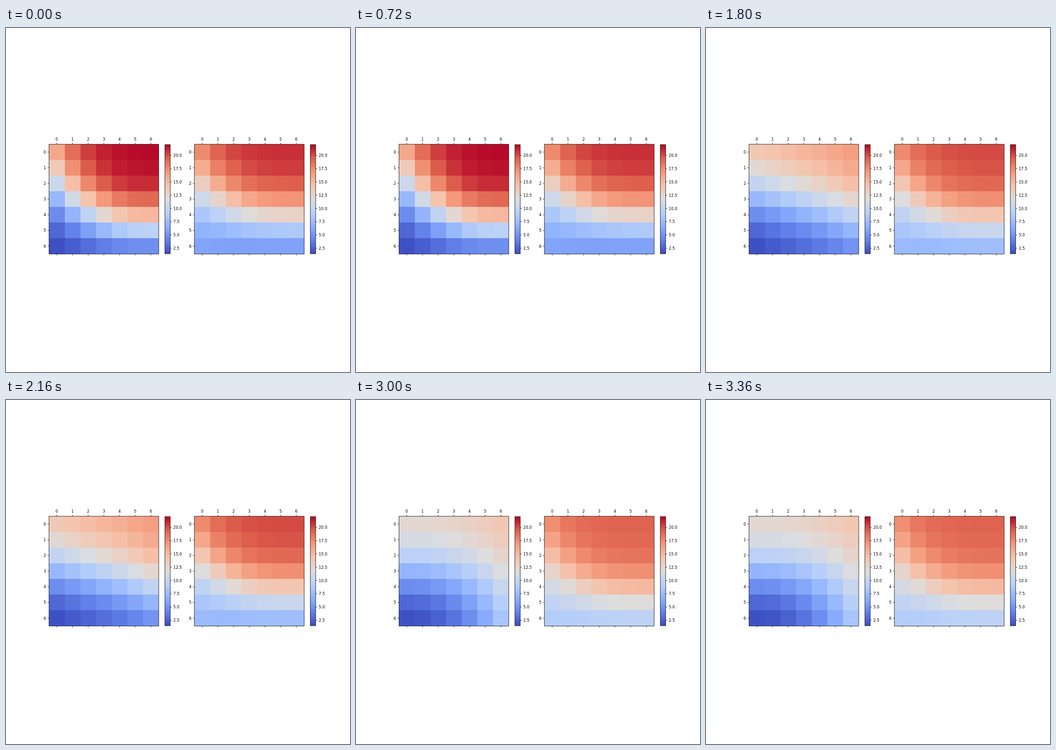
An HTML page for the animation above (3600 ms loop, 748 by 748 pixels).

```html
<!DOCTYPE html>
<html lang="en">
<head>
<meta charset="utf-8">
<title>Heatmap pair</title>
<style>
  html, body { margin: 0; width: 100%; height: 100%; overflow: hidden; background: #fff; }
  svg { display: block; width: 748px; height: 748px; }
  text { font: 8.4px "DejaVu Sans", sans-serif; fill: #000; }
  .line { fill: none; stroke: #000; stroke-width: 0.84; }
  .cell { shape-rendering: crispEdges; }
</style>
</head>
<body>
<svg id="stage" viewBox="0 0 748 748"></svg>
<script>
const COUNT = 7, TOP = 252.8, SIDE = 238.6, CELL = SIDE / COUNT;
const PANEL_GAP = 316.2, LOW = 1.46, HIGH = 22.03;
const LOOP = 3600, STEP = 600, STEPS = 5;

// Colour map stops, evenly spaced from LOW to HIGH.
const STOPS = ["#3b4cc0", "#6282ea", "#8db0fe", "#b8d0f9", "#dddddd",
               "#f5c4ad", "#f49a7b", "#de604d", "#b40426"];
const RGB = STOPS.map(s => [1, 3, 5].map(i => parseInt(s.slice(i, i + 2), 16)));

const mix = (a, b, t) => a + (b - a) * t;
const linear = x => x;
const easeIn = x => x * x;
const easeOut = power => x => 1 - (1 - x) ** power;

function colour(value) {
  const p = Math.min(1, Math.max(0, (value - LOW) / (HIGH - LOW))) * (RGB.length - 1);
  const i = Math.min(RGB.length - 2, Math.floor(p));
  return `rgb(${RGB[i].map((v, k) => Math.round(mix(v, RGB[i + 1][k], p - i)))})`;
}

// Each column falls from high to low along an S-curve centred on row mid.
const curve = (high, low, mid, width) => ({ high, low, mid, width });

// The curves at both side edges, at the first and the last step.
const fields = [
  {
    left: [curve(19.3, 0.5, 2.2, 1.4), curve(13.5, 0.5, 3, 1.3)],
    right: [curve(22, 1, 4.65, 0.9), curve(14.6, 7, 3.6, 1.5)],
    pace: easeOut(1.5), lowPace: easeIn,
    across: [easeOut(2.5), easeIn]
  },
  {
    left: [curve(20, 5, 2.3, 1.4), curve(18.8, 8, 2.7, 1.4)],
    right: [curve(21, 4, 4.1, 0.9), curve(19.4, 7.5, 4.5, 0.95)],
    pace: linear, lowPace: linear,
    across: [easeOut(3), easeOut(3)]
  }
];

function valueAt({ left, right, pace, lowPace, across }, row, col, progress) {
  const t = pace(progress), x = col / (COUNT - 1);
  const e = mix(across[0](x), across[1](x), t);
  const get = (key, time = t) =>
    mix(mix(left[0][key], left[1][key], time), mix(right[0][key], right[1][key], time), e);
  const low = get("low", lowPace(progress));
  return low + (get("high") - low) / (1 + Math.exp((row - get("mid")) / get("width")));
}

const stage = document.getElementById("stage");

function add(parent, tag, attrs, text) {
  const node = document.createElementNS("http://www.w3.org/2000/svg", tag);
  for (const key in attrs) node.setAttribute(key, attrs[key]);
  if (text !== undefined) node.textContent = text;
  parent.append(node);
  return node;
}

const line = d => add(stage, "path", { class: "line", d });
const label = (x, y, anchor, text) => add(stage, "text", { x, y, "text-anchor": anchor }, text);
const frame = (x, y, width, height) => add(stage, "rect", { class: "line", x, y, width, height });

const ramp = add(add(stage, "defs", {}), "linearGradient", { id: "ramp", x1: 0, y1: 1, x2: 0, y2: 0 });
STOPS.forEach((s, i) => add(ramp, "stop", { offset: i / (STOPS.length - 1), "stop-color": s }));

function heatmap(left, field) {
  const cells = [];
  for (let row = 0; row < COUNT; row++) {
    for (let col = 0; col < COUNT; col++) {
      const x = Math.round(left + col * CELL), y = Math.round(TOP + row * CELL);
      const node = add(stage, "rect", {
        class: "cell", x, y,
        width: Math.round(left + (col + 1) * CELL) - x,
        height: Math.round(TOP + (row + 1) * CELL) - y
      });
      cells.push({ node, row, col });
    }
  }
  frame(left, TOP, SIDE, SIDE);
  for (let i = 0; i < COUNT; i++) {
    const x = left + (i + 0.5) * CELL, y = TOP + (i + 0.5) * CELL;
    line(`M${x} ${TOP}v-3.2M${x} ${TOP + SIDE}v3.2M${left} ${y}h-3.2`);
    label(x, 245, "middle", i);
    label(left - 6.3, y + 3.2, "end", i);
  }
  return progress => cells.forEach(({ node, row, col }) =>
    node.setAttribute("fill", colour(valueAt(field, row, col, progress))));
}

function colourBar(x) {
  const y = 253.7, width = 11.5, height = 237.2;
  add(stage, "rect", { x, y, width, height, fill: "url(#ramp)" });
  frame(x, y, width, height);
  for (let v = 2.5; v <= 20; v += 2.5) {
    const ty = y + height * (HIGH - v) / (HIGH - LOW);
    line(`M${x + width} ${ty}h3.2`);
    label(x + 18.2, ty + 3.2, "start", v.toFixed(1));
  }
}

const painters = fields.map((field, i) => {
  colourBar(345.6 + i * PANEL_GAP);
  return heatmap(93.5 + i * PANEL_GAP, field);
});

let shown = -1;
function tick() {
  // The first step lasts twice as long as the others.
  const step = Math.max(0, Math.floor(performance.now() % LOOP / STEP) - 1);
  if (step !== shown) {
    shown = step;
    painters.forEach(paint => paint(step / (STEPS - 1)));
  }
  requestAnimationFrame(tick);
}
tick();
</script>
</body>
</html>
```
